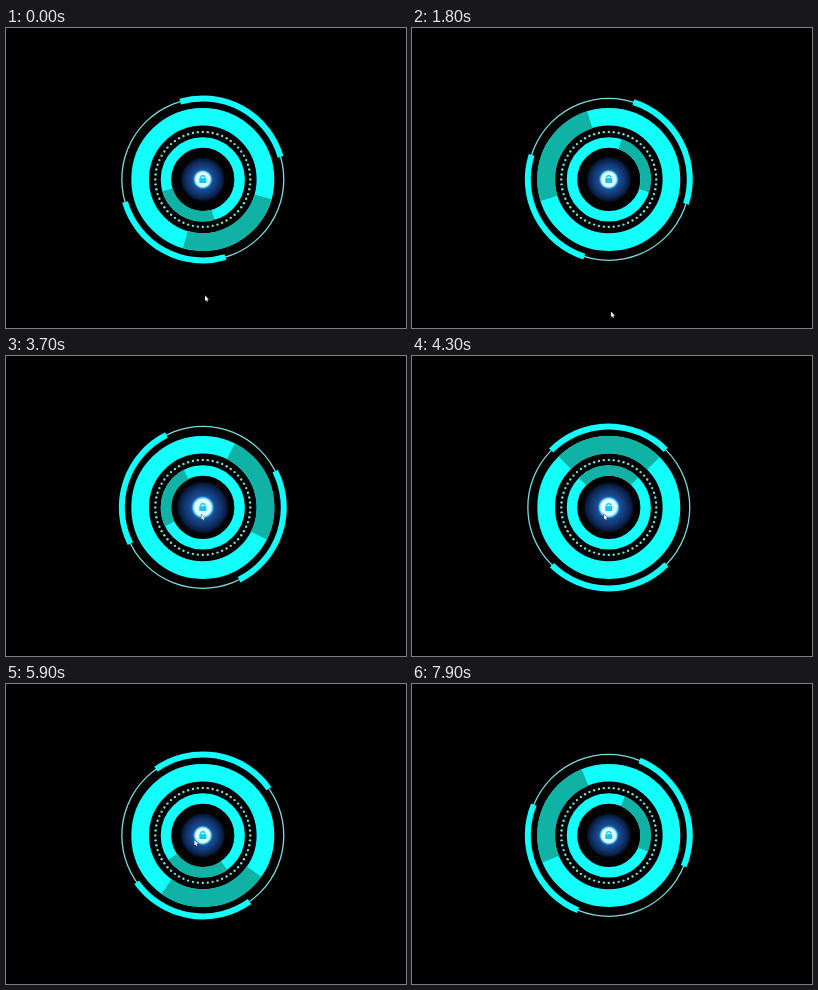
Recreate the animation shown at these times as an HTML page with a canvas. Size 400 by 300 pixels, loop 8 s.

```html
<!DOCTYPE html>
<html lang="en">
<head>
<meta charset="utf-8">
<title>Lock dial</title>
<style>
  html, body { margin: 0; width: 100%; height: 100%; overflow: hidden; background: #000; }
  canvas { display: block; width: 400px; height: 300px; }
</style>
</head>
<body>
<canvas id="stage"></canvas>
<script>
const LOOP = 8, STEP = 0.1;
const CX = 196.8, CY = 151.4;
const CYAN = '#12fffb', TEAL = '#11b2a6', PALE = '#7fd9de', LOCK = '#22bfec';
const RAD = Math.PI / 180;

// Pointer stops: it dips, rises onto the lock, lingers, then leaves.
const STOPS = [
  { s: 1.1, x: 199, y: 267.5 },
  { s: 1.9, x: 199, y: 286 },
  { s: 2.6, x: 201.8, y: 158.5 },
  { s: 4.9, x: 188.4, y: 158 },
  { s: 6.4, x: 188.4, y: 155 },
  { s: 7.4, x: 373, y: 56.5 },
];

const canvas = document.getElementById('stage');
const ctx = canvas.getContext('2d');
const scale = window.devicePixelRatio || 1;
canvas.width = 400 * scale;
canvas.height = 300 * scale;

const turnAt = s => 118.8 + 118.8 * s;

// The glow swells while the pointer is on the lock.
const glowAt = s => 23 + 4 * Math.exp(-(((s - 3.7) / 1.2) ** 2));

function pointerAt(s) {
  const next = Math.max(1, STOPS.findIndex(p => p.s >= s));
  const a = STOPS[next - 1], b = STOPS[next];
  const k = Math.max(0, (s - a.s) / (b.s - a.s));
  return [a.x + (b.x - a.x) * k, a.y + (b.y - a.y) * k];
}

function circle(x, y, r) {
  ctx.beginPath();
  ctx.arc(x, y, r, 0, Math.PI * 2);
  ctx.closePath();
}

function ring(inner, outer, color) {
  circle(0, 0, (inner + outer) / 2);
  ctx.lineWidth = outer - inner;
  ctx.strokeStyle = color;
  ctx.stroke();
}

// Quarter ring centred on the angle mid, in degrees clockwise from the right.
function quarter(inner, outer, color, mid) {
  ctx.beginPath();
  ctx.arc(0, 0, (inner + outer) / 2, (mid - 45) * RAD, (mid + 45) * RAD);
  ctx.lineWidth = outer - inner;
  ctx.strokeStyle = color;
  ctx.stroke();
}

function dots(count, r) {
  ctx.fillStyle = PALE;
  for (let i = 0; i < count; i++) {
    const a = i / count * Math.PI * 2;
    circle(r * Math.cos(a), r * Math.sin(a), 1.2);
    ctx.fill();
  }
}

function disc(r, ...stops) {
  const g = ctx.createRadialGradient(0, 0, 0, 0, 0, r);
  stops.forEach(([p, c]) => g.addColorStop(p, c));
  ctx.fillStyle = g;
  circle(0, 0, r);
  ctx.fill();
}

function lock(size) {
  disc(size, [0, '#1f6fd0'], [0.4, '#1b519c'], [0.65, '#123872'],
    [0.88, '#081c42'], [1, 'rgba(4,12,30,0)']);
  disc(size * 0.44, [0, '#9cf0ff'], [0.45, '#d8fbff'], [0.64, '#ffffff'],
    [0.8, '#5fe2ff'], [1, 'rgba(30,120,220,0)']);
  ctx.fillStyle = LOCK;
  ctx.fillRect(-3.4, -1.2, 6.8, 4.8);
  ctx.strokeStyle = LOCK;
  ctx.lineWidth = 1.1;
  ctx.beginPath();
  ctx.arc(0, -1.6, 2.2, Math.PI, 0);
  ctx.stroke();
}

function pointer(x, y) {
  ctx.save();
  ctx.translate(x, y);
  ctx.beginPath();
  [[0, 0], [0, 5.4], [1.2, 4.4], [2, 6.2], [3, 5.8], [2.2, 4], [3.9, 3.9]]
    .forEach(([px, py]) => ctx.lineTo(px, py));
  ctx.closePath();
  ctx.lineWidth = 0.8;
  ctx.strokeStyle = '#111';
  ctx.stroke();
  ctx.fillStyle = '#f4f4f4';
  ctx.fill();
  ctx.restore();
}

function draw(s) {
  const turn = turnAt(s);
  ctx.setTransform(scale, 0, 0, scale, 0, 0);
  ctx.fillStyle = '#000';
  ctx.fillRect(0, 0, 400, 300);

  ctx.save();
  ctx.translate(CX, CY);
  ring(80.3, 81.6, PALE);
  quarter(78, 84, CYAN, turn);
  quarter(78, 84, CYAN, turn + 180);
  ring(53.8, 71.5, CYAN);
  quarter(53.8, 71.5, TEAL, 180 - turn);
  dots(60, 47.5);
  ring(31.6, 42.1, CYAN);
  quarter(31.6, 42.1, TEAL, turn);
  lock(glowAt(s));
  ctx.restore();

  if (s <= STOPS[STOPS.length - 1].s) pointer(...pointerAt(s));
}

function frame(now) {
  const step = Math.floor(now / 1000 % LOOP / STEP);
  draw(step < 2 ? 0 : step / 10);
  requestAnimationFrame(frame);
}
requestAnimationFrame(frame);
</script>
</body>
</html>
```
